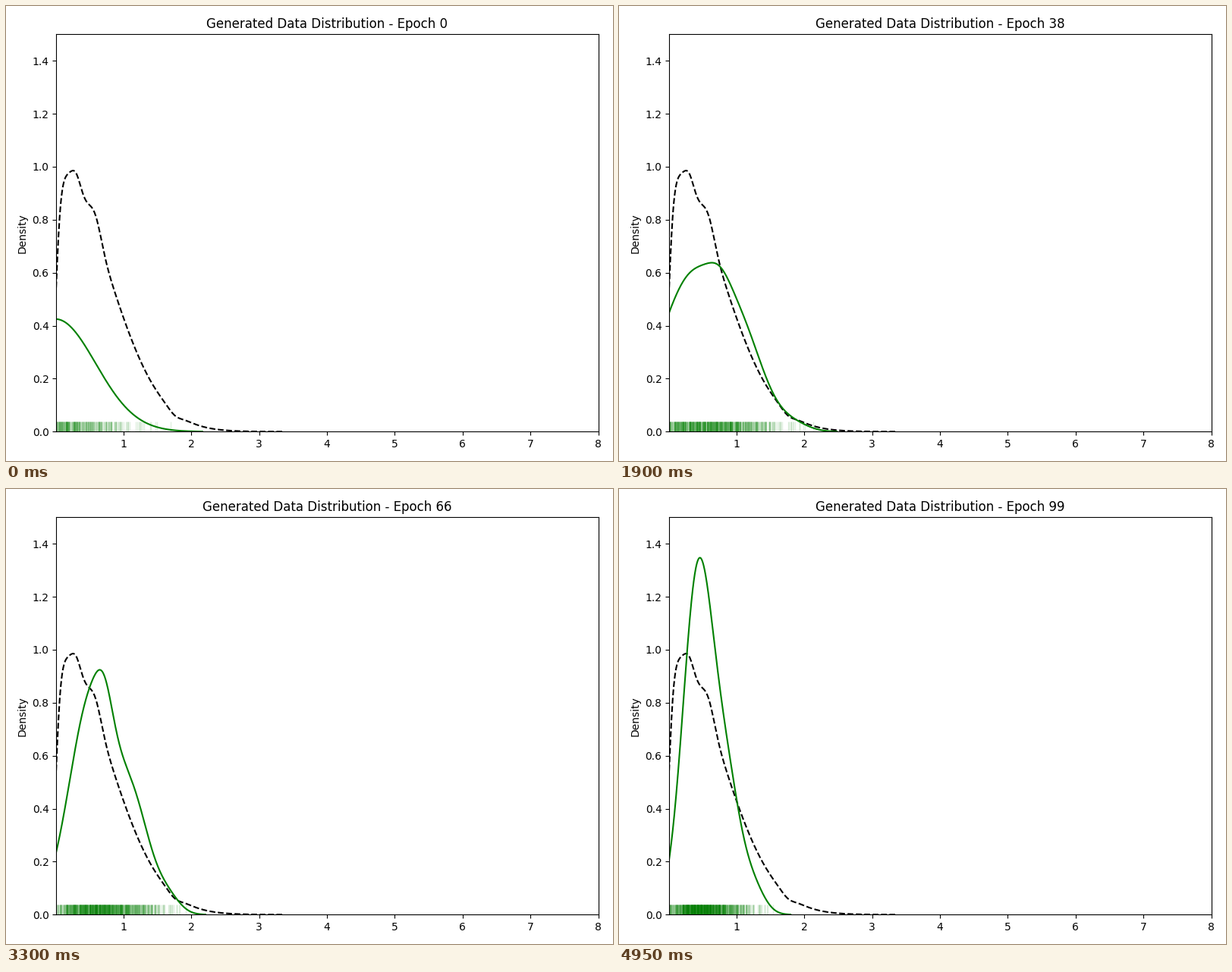
Recreate the animation shown at these times as a matplotlib script. Size 800 by 600 pixels, loop 5000 ms.

```python
import numpy as np
import matplotlib.pyplot as plt
from matplotlib.animation import FuncAnimation
from matplotlib.collections import LineCollection

EPOCHS = 100
SAMPLES = 1000

# Each density is a sum of bumps: (height, centre, width).
REAL = [(1, 0, .77), (.05, .3, .07), (.07, .585, .09), (-.013, 1.76, .09)]

# Poses of the generated density: body, peak, shoulder and tail.
POSES = {
    0: [(.425, 0, .59), (0, .75, .16), (0, 1, .38), (0, 1.85, .22)],
    26: [(.51, .25, .55), (0, .75, .16), (.2, 1, .38), (0, 1.85, .22)],
    53: [(.68, .5, .4), (.12, .75, .16), (.32, 1.22, .28), (.055, 1.85, .22)],
    66: [(.84, .55, .34), (.11, .72, .12), (.31, 1.18, .24), (.06, 1.65, .18)],
    99: [(1.3, .44, .226), (0, .45, .12), (.43, .87, .2), (.09, 1.25, .17)],
}


def density(x, bumps):
    return sum(h * np.exp(-0.5 * ((x - m) / s) ** 2) for h, m, s in bumps)


def pose(epoch):
    """Bumps at the given epoch, blended between the neighbouring poses."""
    keys = list(POSES)
    i = min(np.searchsorted(keys, epoch, side="right"), len(keys) - 1)
    a, b = keys[i - 1], keys[i]
    t = (epoch - a) / (b - a)
    return (1 - t) * np.array(POSES[a]) + t * np.array(POSES[b])


def visible_samples(y):
    """Positive samples, placed by the inverse of the cumulative density."""
    cdf = np.concatenate([[0], np.cumsum((y[1:] + y[:-1]) / 2 * np.diff(grid))])
    hidden = max(1 - cdf[-1], 0)
    return 0.97 * np.interp(ranks[ranks > hidden], hidden + cdf, grid)


grid = np.linspace(0, 3, 600)
ranks = np.random.default_rng(7).random(SAMPLES)

fig, ax = plt.subplots(figsize=(8, 6), dpi=100)
ax.set_xlim(0.01, 8)
ax.set_ylim(0, 1.5)
ax.set_ylabel("Density")
title = ax.set_title("Generated Data Distribution - Epoch 0")
fig.tight_layout()

# The real data stops at zero, so its smoothed edge is a steep step.
real_x = np.linspace(-0.18, 3.36, 400)
step = (1 + np.tanh(12.3 * real_x)) / 2
ax.plot(real_x, step * density(real_x, REAL), color="black", ls="--", lw=1.5)

curve, = ax.plot([], [], color="green", lw=1.5)
rug = LineCollection([], colors="green", alpha=0.12, linewidths=1,
                     transform=ax.get_xaxis_transform(), zorder=2)
ax.add_collection(rug, autolim=False)


def update(epoch):
    y = density(grid, pose(epoch))
    drawn = y > 0.0005
    curve.set_data(grid[drawn], y[drawn])
    rug.set_segments([[(x, 0), (x, 0.025)] for x in visible_samples(y)])
    title.set_text(f"Generated Data Distribution - Epoch {epoch}")
    return curve, rug, title


anim = FuncAnimation(fig, update, frames=EPOCHS, interval=50,
                     repeat=True, repeat_delay=0)
plt.show()
```
